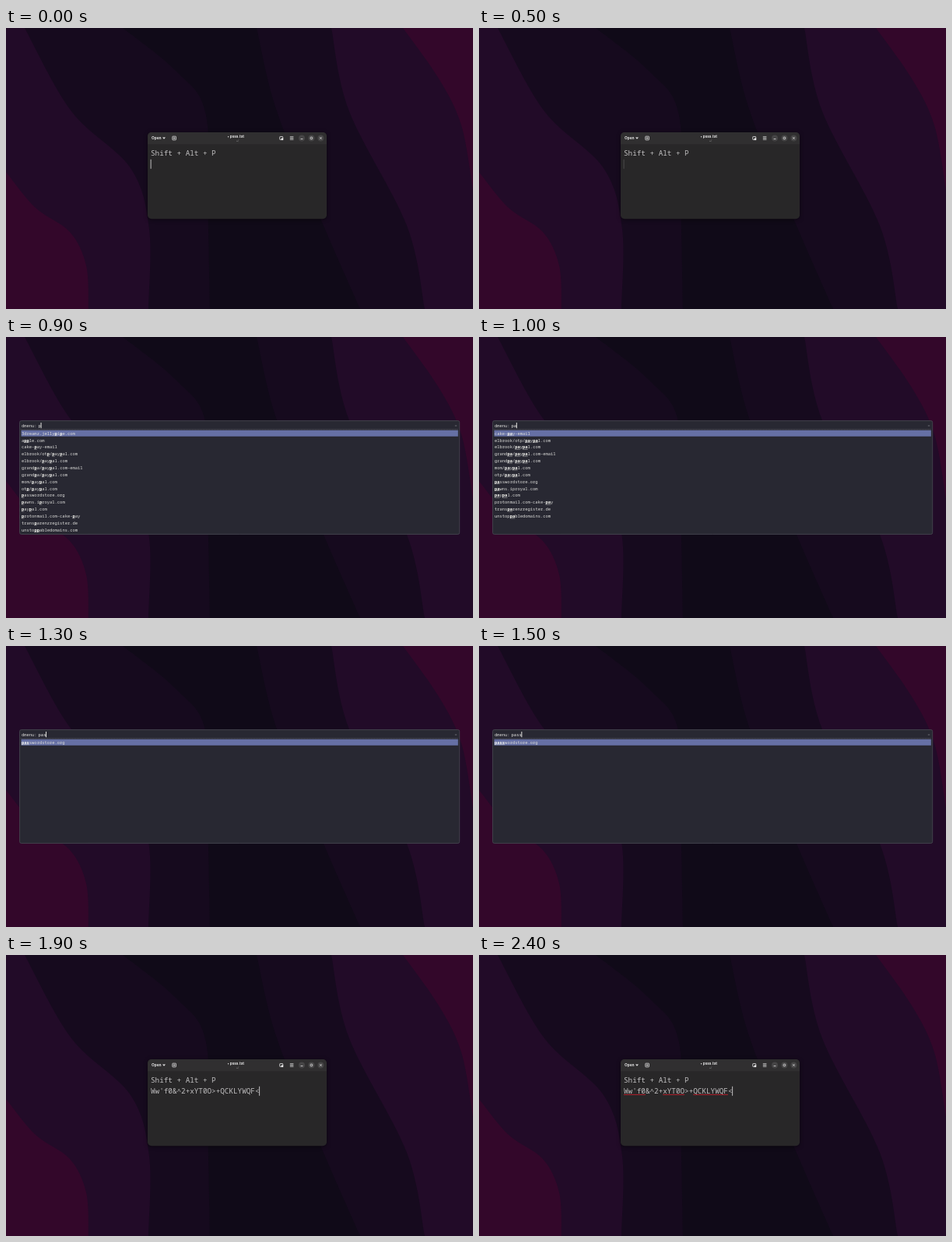
An HTML page with a canvas for the animation above (2600 ms loop, 600x361 px).

```html
<!DOCTYPE html>
<html lang="en">
<head>
<meta charset="utf-8">
<title>Password menu</title>
<style>
  html, body { margin: 0; width: 100%; height: 100%; overflow: hidden; background: #100a18; }
  canvas { display: block; width: 600px; height: 361px; }
</style>
</head>
<body>
<canvas id="stage"></canvas>
<script>
const W = 600, H = 361, LOOP = 2600, TICK = 100;
const canvas = document.getElementById('stage');
const ctx = canvas.getContext('2d');
const dpr = window.devicePixelRatio || 1;
canvas.width = W * dpr;
canvas.height = H * dpr;
ctx.scale(dpr, dpr);

const MONO = '"Noto Sans Mono", monospace';
const SANS = 'Inter, sans-serif';
const INK = '#e6e6e6';

const MENU_OPEN = 600, MENU_CLOSE = 1600, SPELLCHECK = 2300;
const SEARCH = 'pass', KEY_TIMES = [800, 1000, 1300, 1400];
const PASSWORD = "Ww'f0&^2+xYT0O>+QCKLYWQF<";
const CHARS_PER_TICK = 13;
const ENTRIES = `3dreamz.jellypipe.com aboutyou.de aex.com airbnb.de allianz.de
  allianz.de-username amazon.de aok-insurance-number apple.com archive.org
  arrr-seed autodesk.com aws.amazon.com backblaze.com binance.com cake-pay-email
  elbrook/otp/paypal.com elbrook/paypal.com grandpa/paypal.com-email
  grandpa/paypal.com mom/paypal.com otp/paypal.com passwordstore.org
  pawns.iproyal.com paypal.com protonmail.com-cake-pay transparenzregister.de
  unstoppabledomains.com`.split(/\s+/);

// Wallpaper bands: each edge is a spline through key points, filled out to one side.
const SHADES = ['#160a1e', '#220b28', '#33072a'];
const LEFT_EDGES = [
  [[150, 0], [218, 55], [257, 112], [260, 258], [262, H]],
  [[24, 0], [84, 107], [160, 180], [184, 258], [183, H]],
  [[0, 185], [38, 231], [82, 262], [103, 305], [106, H]]
];
const RIGHT_EDGES = [
  [[322, 0], [348, 107], [408, 254], [455, H]],
  [[418, 0], [441, 107], [515, 254], [538, H]],
  [[510, 0], [556, 65], [585, 125], [W, 208]]
];

function spline(pts) {
  const at = i => pts[Math.max(0, Math.min(pts.length - 1, i))];
  ctx.moveTo(...pts[0]);
  for (let i = 0; i < pts.length - 1; i++) {
    const [a, b, c, d] = [-1, 0, 1, 2].map(k => at(i + k));
    ctx.bezierCurveTo(
      b[0] + (c[0] - a[0]) / 6, b[1] + (c[1] - a[1]) / 6,
      c[0] - (d[0] - b[0]) / 6, c[1] - (d[1] - b[1]) / 6, ...c);
  }
}

function drawBand(pts, side, color) {
  ctx.beginPath();
  spline(pts);
  ctx.lineTo(side, pts[pts.length - 1][1]);
  ctx.lineTo(side, pts[0][1]);
  ctx.fillStyle = color;
  ctx.fill();
}

function drawWallpaper() {
  ctx.fillStyle = '#100a18';
  ctx.fillRect(0, 0, W, H);
  SHADES.forEach((color, i) => {
    drawBand(LEFT_EDGES[i], 0, color);
    drawBand(RIGHT_EDGES[i], W, color);
  });
}

function box(x, y, w, h, r, fill, stroke) {
  ctx.beginPath();
  ctx.roundRect(x, y, w, h, r);
  if (fill) { ctx.fillStyle = fill; ctx.fill(); }
  if (stroke) { ctx.strokeStyle = stroke; ctx.stroke(); }
}

function text(str, x, y, font, color, align = 'left') {
  ctx.font = font;
  ctx.fillStyle = color;
  ctx.textAlign = align;
  ctx.fillText(str, x, y);
}

function line(x1, y1, x2, y2, color, width) {
  ctx.strokeStyle = color;
  ctx.lineWidth = width;
  ctx.beginPath();
  ctx.moveTo(x1, y1);
  ctx.lineTo(x2, y2);
  ctx.stroke();
}

function drawHeader() {
  const mid = 141.5;
  const stroke = (x1, y1, x2, y2) => line(x1, mid + y1, x2, mid + y2, INK, 0.8);
  const square = (x, r) => box(x - r, mid - r, 2 * r, 2 * r, 0.6, null, INK);

  text('Open', 187, 143.3, `700 4.8px ${SANS}`, INK);
  ctx.beginPath();
  ctx.moveTo(201, 140.4);
  ctx.lineTo(205, 140.4);
  ctx.lineTo(203, 142.8);
  ctx.fill();
  stroke(214.8, 0, 217.4, 0);
  stroke(216.1, -1.3, 216.1, 1.3);
  square(216.1, 2.3);

  text('• psss.txt', 295.3, 141, `700 4.6px ${SANS}`, INK, 'center');
  text('~/', 297.5, 146, `3.6px ${SANS}`, '#858585', 'center');

  square(353.7, 2);
  ctx.fillStyle = INK;
  ctx.fillRect(353.6, mid, 2.6, 2.6);
  for (const dy of [-1.8, 0, 1.8]) stroke(364.8, dy, 369.4, dy);

  const [min, max, close] = [380, 392.4, 404.4];
  for (const x of [min, max, close]) box(x - 4, mid - 4, 8, 8, 4, '#464546');
  stroke(min - 1.4, 1.1, min + 1.4, 1.1);
  square(max, 1.3);
  for (const s of [-1.3, 1.3]) stroke(close - 1.3, s, close + 1.3, -s);
}

function drawEditor(typed, cursorAlpha, underlined) {
  const font = `9.3px ${MONO}`, color = '#c0bfc0', left = 186, step = 9.3 * 0.6;
  ctx.save();
  ctx.shadowColor = 'rgba(0,0,0,.5)';
  ctx.shadowBlur = 5 * dpr;
  ctx.shadowOffsetY = dpr;
  box(182, 134, 230, 111.3, 5, '#282728');
  ctx.restore();
  box(182, 134, 230, 15.2, [5, 5, 0, 0], '#302f30');
  drawHeader();

  text('Shift + Alt + P', left, 163.7, font, color);
  text(typed, left, 178, font, color);
  if (underlined) {
    // The spell checker marks words of several letters or digits.
    for (const { 0: word, index } of typed.matchAll(/[\w']{2,}/g)) {
      const x = left + index * step;
      line(x, 179.4, x + word.length * step, 179.4, '#b5202c', 1);
    }
  }
  ctx.fillStyle = `rgba(190,189,190,${cursorAlpha})`;
  ctx.fillRect(left - 0.4 + typed.length * step, 168.8, 1, 12);
}

function drawEntry(name, query, y) {
  const size = 5.46, step = size * 0.6;
  const plain = `${size}px ${MONO}`, bold = `700 ${size}px ${MONO}`;
  let x = 20;
  (query ? name.split(query) : [name]).forEach((part, i) => {
    if (i) {
      const end = x + query.length * step;
      text(query, x, y, bold, '#f8f8f2');
      line(x, y + 0.9, end, y + 0.9, '#d8d8d6', 0.5);
      x = end;
    }
    text(part, x, y, plain, '#dededb');
    x += part.length * step;
  });
}

function drawMenu(query) {
  const font = `5.46px ${MONO}`;
  ctx.lineWidth = 0.9;
  box(17.6, 107.6, 565.1, 145.8, 2, '#282832', '#464650');
  text('dmenu:', 20, 115.7, font, '#dededb');
  text(query || 'Type to filter', 41.6, 115.7, font, query ? '#f0f0ec' : '#6d6e74');
  ctx.fillStyle = '#f8f8f2';
  ctx.fillRect(41.3 + query.length * 3.276, 110, 0.9, 7.2);
  line(576.8, 114, 579.2, 114, '#8a8b90', 0.7);

  ctx.setLineDash([1.2, 0.8]);
  line(19, 118.8, 581, 118.8, '#62626c', 0.8);
  ctx.setLineDash([]);

  ctx.fillStyle = '#6670a5';
  ctx.fillRect(19.5, 119.8, 561.3, 7.9);
  ENTRIES.filter(name => name.includes(query)).slice(0, 15)
    .forEach((name, i) => drawEntry(name, query, 125.7 + i * 8.857));
}

function render(t) {
  const tick = from => Math.floor((t - from) / TICK);
  drawWallpaper();
  if (t < MENU_OPEN) {
    // The caret blinks out just before the menu opens.
    drawEditor('', 1 - 0.38 * Math.max(0, tick(300)), false);
  } else if (t < MENU_CLOSE) {
    drawMenu(SEARCH.slice(0, KEY_TIMES.filter(key => key <= t).length));
  } else {
    const ticks = tick(MENU_CLOSE);
    drawEditor(PASSWORD.slice(0, ticks * CHARS_PER_TICK), Math.min(1, 0.7 + 0.3 * ticks), t >= SPELLCHECK);
  }
}

const start = performance.now();
function frame() {
  render((performance.now() - start) % LOOP);
  requestAnimationFrame(frame);
}
frame();
</script>
</body>
</html>
```
